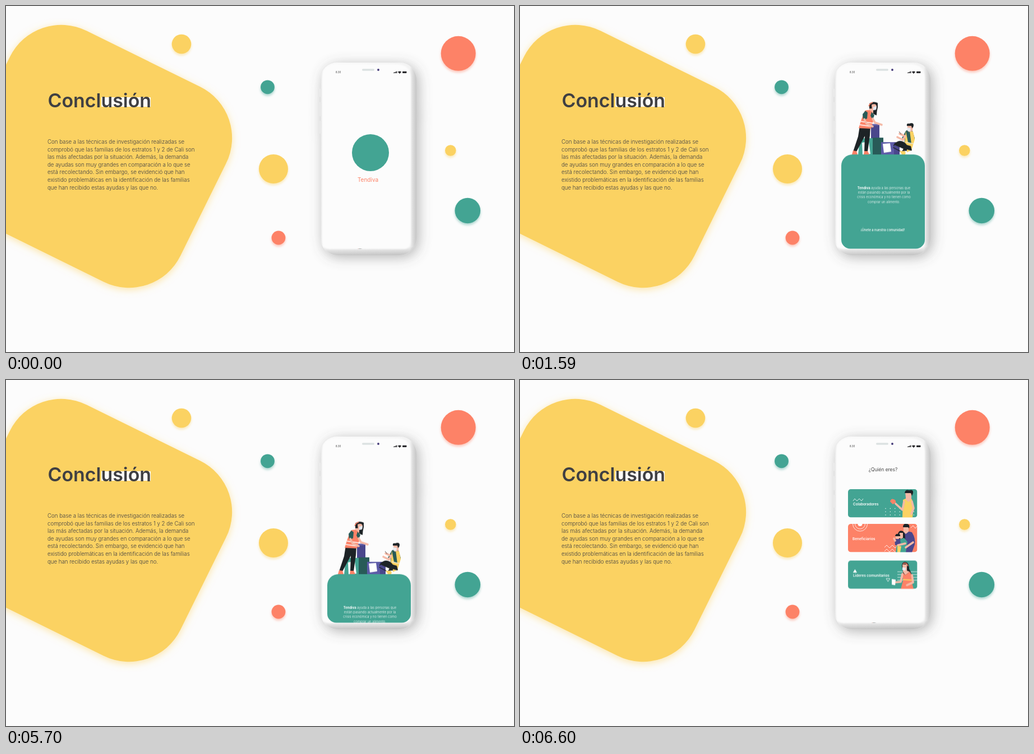
An HTML page for the animation above (8000 ms loop, 906 by 618 pixels).

```html
<!DOCTYPE html>
<html lang="es">
<head>
<meta charset="utf-8">
<title>Conclusión</title>
<style>
  html, body { margin: 0; width: 100%; height: 100%; overflow: hidden; background: #fcfcfc; }
  svg { display: block; width: 100vw; height: 100vh; font-family: Inter, "Open Sans", sans-serif; }
  .yellow { fill: #fbd262; } .teal { fill: #43a493; } .coral { fill: #fd8267; }
  .ink { fill: #1d2326; } .skin { fill: #f4b9a6; } .white { fill: #fff; }
  .navy { fill: #4a478c; } .pine { fill: #285b58; }
  .line { fill: none; stroke: #fff; stroke-width: .8; }
  .limb { fill: none; stroke: #f4b9a6; stroke-width: 3.6; stroke-linecap: round; stroke-linejoin: round; }
  .body { font-size: 9.68px; font-weight: 300; fill: #3f3f42; }
  .note { font-size: 5.9px; font-weight: 300; fill: #fff; text-anchor: middle; }
  .label { font-size: 6.4px; font-weight: 600; fill: #fff; }
</style>
</head>
<body>
<svg viewBox="0 0 906 618">
  <defs>
    <filter id="glow" x="-20%" y="-20%" width="140%" height="140%">
      <feDropShadow dx="0" dy="3" stdDeviation="7" flood-color="#fbd262" flood-opacity=".55"/>
    </filter>
    <filter id="phoneShadow" x="-40%" y="-25%" width="180%" height="150%">
      <feDropShadow dx="4" dy="4" stdDeviation="11" flood-color="#555" flood-opacity=".42"/>
    </filter>
    <filter id="soft"><feGaussianBlur stdDeviation="1"/></filter>
    <linearGradient id="side">
      <stop offset="0" stop-color="#e4e4e4"/><stop offset=".03" stop-color="#fafafa"/>
      <stop offset=".93" stop-color="#f3f3f3"/><stop offset=".96" stop-color="#dedede"/>
      <stop offset="1" stop-color="#c6c6c6"/>
    </linearGradient>
    <linearGradient id="base" x2="0" y2="1">
      <stop offset=".955" stop-color="#000" stop-opacity="0"/><stop offset="1" stop-color="#000" stop-opacity=".2"/>
    </linearGradient>
    <clipPath id="screen"><rect x="573" y="103" width="149" height="330.5" rx="16"/></clipPath>
    <clipPath id="cardClip"><rect width="123.5" height="50.5" rx="5"/></clipPath>
  </defs>

  <rect width="906" height="618" fill="#fcfcfc"/>
  <g filter="url(#glow)">
    <rect class="yellow" x="-215" y="-194.25" width="430" height="388.5" rx="102"
      transform="translate(159 268.5) rotate(26.25)"/>
  </g>
  <rect x="170" y="163" width="88" height="17" fill="#fffdf8"/>
  <text x="74.5" y="181" font-size="33.9" font-weight="600" fill="#3f3f42">Conclusión</text>
  <g id="paragraph" class="body"></g>
  <g id="dots"></g>

  <g filter="url(#phoneShadow)">
    <path d="M561 148v14M561 172v25M561 205v23" stroke="#ececec" stroke-width="2.4"/>
    <path d="M732 178v30" stroke="#cfcfcf" stroke-width="2"/>
    <rect x="561" y="101" width="171" height="344" rx="30" fill="url(#side)"/>
  </g>
  <rect x="561" y="101" width="171" height="344" rx="30" fill="url(#base)"/>
  <path d="M590 104H696Q722 104 722 130V420Q722 434 708 434H578Q564 434 564 418V130Q564 104 590 104Z"
    fill="#fcfcfc" filter="url(#soft)"/>
  <rect x="635" y="112.3" width="22" height="3.4" rx="1.7" fill="#dce2e2"/>
  <circle cx="664" cy="114" r="1.9" fill="#443a78"/>
  <text x="588" y="120" font-size="4.4" fill="#333">8.30</text>
  <g fill="#2b2b2e">
    <path d="M691 120v-1.3h1.3v1.3zM692.8 120v-2h1.3v2zM694.5 120v-2.8h1.3v2.8zM696.2 120v-3.6h1.3v3.6z"/>
    <path d="M698.8 117.8Q702 115 705.2 117.8L702 121Z"/>
    <rect x="707" y="116.7" width="7.5" height="3.2" rx=".8"/>
  </g>

  <g clip-path="url(#screen)">
    <g id="logo">
      <circle class="teal" cx="650" cy="262" r="33"/>
      <text class="coral" x="645.5" y="314" font-size="10" text-anchor="middle">Tendiva</text>
    </g>

    <g id="welcome">
      <path class="teal" d="M606 229h24v30h-27z"/>
      <path class="white" d="M610 237l12-2 3 22-14 1z"/>
      <path class="navy" d="M626 205h15v24h-15z"/><ellipse cx="633.5" cy="205" rx="7.5" ry="1.6" fill="#625fa9"/>
      <path class="pine" d="M629 228h19v31h-19z"/>
      <path d="M644 236h33v23h-33z" fill="#5d5ba8"/>
      <path class="navy" d="M667 236h10v23h-10z"/>
      <path class="white" d="M647 239l13-1 2 15-13 2z"/>
      <path class="ink" d="M606 207H625L624 224 620 253H614L615 225 600 253H594L603 226Z"/>
      <path class="coral" d="M594 251l6 1 2 6h-10zM614 252h6l3 6h-10z"/>
      <g transform="translate(1 -2)">
        <path class="ink" d="M622 169Q629 164 637 168L637 176Q635 183 635 190Q628 189 622 178Z"/>
        <path class="skin" d="M622 178h7v8h-9zM626 171q8-3 9 3l-1 6-7 1z"/>
        <path d="M629 175l6-1-1 6-5 1z" fill="#e4eaf2"/>
        <path d="M621 174Q622 169 628 167" fill="none" stroke="#fd8267" stroke-width="1.7"/>
      </g>
      <path class="coral" d="M615 180Q624 176 629 184L630 198 626 212 604 211 609 195Z"/>
      <path class="pine" d="M616 180l-5 6 1 10 7-2 1-11zM627 182l5 6-3 8-4-7z"/>
      <path d="M608 199l21 3M606 205l21 3" stroke="#fff" stroke-width="1.7"/>
      <path class="limb" d="M614 195L618 203 629 208M629 194L633 201 645 205"/>

      <path class="white" d="M672 217l8 2-2 10-8-2z"/>
      <path class="pine" d="M688 216Q694 211 700 216L704 229 698 247 685 246 686 229 681 229Z"/>
      <path class="yellow" d="M688 216l4 20 6 3-3-23 6 1 3 14-6 20-15-2 3-11z"/>
      <path d="M688 236l14 3" stroke="#eee8cf" stroke-width="1.4"/>
      <path class="limb" d="M687 225L683 232 673 227M684 224L677 221"/>
      <path d="M676 217l4 5" stroke="#333" stroke-width=".8"/>
      <path class="ink" d="M690 241Q682 231 673 235Q665 239 666 245L679 252 699 251 697 243ZM668 241l16 7-4 6-15-8z"/>
      <path class="yellow" d="M677 252h9l2 3-2 5h-4l-2-4zM690 249l7 2-7 3z"/>
      <path class="skin" d="M691 206h10l-1 10-7 2-2-6z"/>
      <path d="M690 210l7 1-1 6-5-1z" fill="#e9edf2"/>
      <path class="ink" d="M690 207Q689 202 694 203Q701 200 702 205Q702 210 699 211L698 207Z"/>

      <rect class="teal" x="573" y="258" width="149" height="310" rx="20"/>
      <text class="note" x="649" y="319.5"><tspan font-weight="700">Tendiva</tspan> ayuda a las personas que</text>
      <text class="note" x="649" y="328">están pasando actualmente por la</text>
      <text class="note" x="649" y="336.3">crisis económica y no tienen como</text>
      <text class="note" x="649" y="344.6">comprar un alimento.</text>
      <text class="note" x="647" y="395" style="font-weight:500;font-size:5.7px">¡Únete a nuestra comunidad!</text>
    </g>

    <text id="question" x="647.5" y="162.5" font-size="8.4" fill="#444" text-anchor="middle">¿Quién eres?</text>

    <g id="card1"><g transform="translate(585 195)" clip-path="url(#cardClip)">
      <rect class="teal" width="123.5" height="50.5"/>
      <path class="line" d="M9 21l3-4 4 4 4-4 4 4 3-4"/>
      <path d="M67 34.5H123M67 40.3H123M67 46H123" stroke="#fff" stroke-width="1.4" stroke-linecap="round" stroke-dasharray="0 8.4"/>
      <text class="label" x="9" y="29.2">Colaboradores</text>
      <path class="yellow" d="M98 19Q106 14 114 18L117 29 115 51H97Z"/>
      <path class="skin" d="M103 11h10v7l-5 5-5-4z"/>
      <path class="limb" d="M100 22L97 37 85 26M114 22L117 34 113 44"/>
      <path class="skin" d="M102 5h11v9l-5 3-5-2z"/>
      <path class="ink" d="M101 7Q102 0 109 2Q117 0 116 7L114 12 112 7Z"/>
      <path class="coral" d="M75 22q2-6 6-4 5 1 4 6l-5 3z"/>
    </g></g>

    <g id="card2"><g transform="translate(585 257)" clip-path="url(#cardClip)">
      <rect class="coral" width="123.5" height="50.5"/>
      <circle class="white" cx="21.5" cy="0" r="4"/>
      <path class="line" d="M12.5 0a9 9 0 0 0 18 0M8.5 0a13 13 0 0 0 26 0"/>
      <path class="line" d="M65 42l4-4 5 5 5-5 5 5 4-4M65 49l4-4 5 5 5-5 5 5M112 7l4-4 4 5 4-5"/>
      <text class="label" x="8" y="29">Beneficiarios</text>
      <path class="navy" d="M98 17Q105 11 114 15Q121 26 119 37L114 51H98Z"/>
      <path class="skin" d="M99 4h9v10l-5 4-4-4z"/>
      <path class="ink" d="M98 6Q98-1 104 0Q111 0 109 8L107 6Z"/>
      <path class="ink" d="M89 18Q91 10 98 13Q104 18 101 31L91 30Z"/>
      <path class="skin" d="M92 16h6v9l-4 2-3-3z"/>
      <path class="teal" d="M91 28l9-3 6 7-3 19H85l2-14z"/>
      <path class="navy" d="M83 27h10l1 11H84z"/>
      <circle class="skin" cx="88.5" cy="23" r="4"/>
      <path class="ink" d="M84 22q1-5 5-4 5 0 4 4z"/>
      <path class="limb" d="M84 30l-2-4M89 38L102 35M116 33L103 42"/>
      <path class="yellow" d="M88 39l7 1-2 11h-5z"/>
    </g></g>

    <g id="card3"><g transform="translate(585 322.5)" clip-path="url(#cardClip)">
      <rect class="teal" width="123.5" height="50.5"/>
      <path class="white" d="M8.8 21.5l3.6-6 3.6 6z"/>
      <path class="line" d="M68 32h6.5l-3.2 5.5zM88 20h36M88 25h36M88 30h36M88 35h36"/>
      <text class="label" x="9" y="29">Líderes comunitarios</text>
      <path class="ink" d="M96 9Q97 1 104 3Q109 5 109 15Q115 24 113 32L99 28Z"/>
      <path class="skin" d="M97 7h8v11l5 2-8 6-4-6z"/>
      <path d="M97 12l6 1-1 5-5-1z" fill="#e9edf2"/>
      <path d="M98 6Q104 2 107 10" fill="none" stroke="#fd8267" stroke-width="1.5"/>
      <path class="coral" d="M97 21l5 5 8-6 5 8-1 12 3 11H94l4-15z"/>
      <path d="M98 34l16 1" stroke="#fbd262" stroke-width="2"/>
      <path class="limb" d="M97 24L94 38 82 39M114 26L116 39 105 44"/>
      <path class="white" d="M78 33l7 1-1 10-6-1z"/>
    </g></g>
  </g>
</svg>
<script>
const LOOP = 8000;
const byId = id => document.getElementById(id);

function add(parent, tag, attrs, text = "") {
  const node = document.createElementNS("http://www.w3.org/2000/svg", tag);
  for (const key in attrs) node.setAttribute(key, attrs[key]);
  node.textContent = text;
  parent.append(node);
}

[
  "Con base a las técnicas de investigación realizadas se",
  "comprobó que las familias de los estratos 1 y 2 de Cali son",
  "las más afectadas por la situación. Además, la demanda",
  "de ayudas son muy grandes en comparación a lo que se",
  "está recolectando. Sin embargo, se evidenció que han",
  "existido problemáticas en la identificación de las familias",
  "que han recibido estas ayudas y las que no."
].forEach((line, i) => add(byId("paragraph"), "text", { x: 74, y: 246 + i * 13.6 }, line));

const shades = { yellow: "#fbd262", teal: "#43a493", coral: "#fd8267" };
[
  [313, 68, 17.3, "yellow"], [466.5, 144.8, 12.4, "teal"], [477, 291, 26, "yellow"],
  [486, 414, 12.4, "coral"], [806.7, 84.8, 31, "coral"], [792.8, 258, 9.8, "yellow"],
  [823.3, 365.5, 22.8, "teal"]
].forEach(([cx, cy, r, shade]) => add(byId("dots"), "circle", {
  cx, cy, r, class: shade, style: `filter: drop-shadow(0 3px 2px ${shades[shade]}70)`
}));

// Steps are [time, value, easing towards the next step].
function play(id, property, steps) {
  const format = value => property === "opacity" ? value : `translate(${value})`;
  const frames = steps.map(([time, value, easing = "linear"]) =>
    ({ offset: time / LOOP, [property]: format(value), easing }));
  byId(id).animate(frames, { duration: LOOP, iterations: Infinity });
}

const expoOut = "cubic-bezier(.16, 1, .3, 1)";
const below = "0px, 269px", right = "147px, 0px", home = "0px, 0px";

play("logo", "opacity", [[0, 1], [935, 1], [1260, 0], [LOOP, 0]]);
play("welcome", "transform", [
  [0, below], [1407, below, expoOut], [1770, home], [5550, home, "ease"], [6252, below], [LOOP, below]
]);
play("question", "opacity", [[0, 0], [6060, 0], [6270, 1], [LOOP, 1]]);
[6260, 6318, 6376].forEach((start, i) => play(`card${i + 1}`, "transform", [
  [0, right], [start, right, expoOut], [start + 250, home], [LOOP, home]
]));
</script>
</body>
</html>
```
